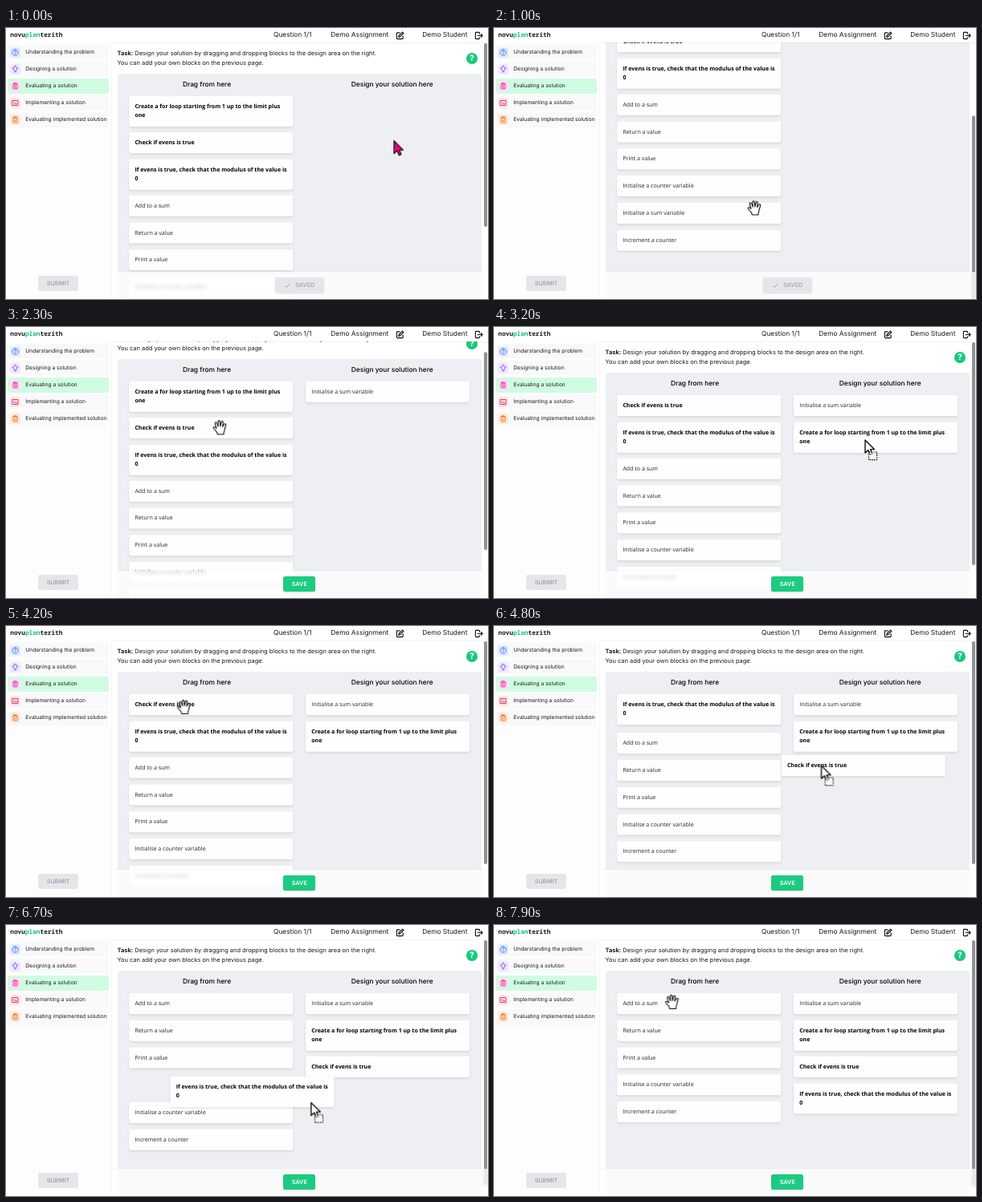
An HTML page that plays this animation: 600x338 px, repeating every 8000 ms.

```html
<!DOCTYPE html>
<html lang="en">
<head>
<meta charset="utf-8">
<title>Block ordering task</title>
<style>
html, body { margin: 0; width: 100%; height: 100%; overflow: hidden; background: #fff; }
#stage { position: relative; width: 600px; height: 338px; overflow: hidden; background: #fff;
  font: 7.46px/12px Inter, sans-serif; color: #17191c; text-rendering: geometricPrecision; }
#stage div, #stage svg { position: absolute; }
#stage svg { overflow: visible; fill: none; stroke-linecap: round; stroke-linejoin: round; }
.t { white-space: pre; }
#side { left: 0; top: 18px; width: 131px; height: 320px; background: #fdfdfd; border-right: 1px solid #f4f5f6; }
.item { left: 2px; width: 126px; height: 18.6px; border-radius: 2px; background: #f9f9fb; }
.item.on { background: #cffce1; }
.badge { left: 3px; top: 2.8px; width: 13px; height: 13px; border-radius: 3px; }
.btn { top: 7.2px; height: 19.2px; border-radius: 2.5px; line-height: 19.2px; text-align: center;
  font-weight: 600; font-size: 7.3px; }
.off { background: #e4e6ea; color: #9ea3ab; }
.save { background: #1bcb7f; color: #fff; box-shadow: 0 1px 2px #0000001c; }
#view { left: 132px; top: 18px; width: 468px; height: 320px; overflow: hidden; }
#page { left: -132px; top: -18px; width: 600px; height: 520px; }
#panel { left: 138.5px; top: 57px; width: 453.5px; height: 460px; border-radius: 4px; background: #edeff2; }
#help { left: 573.2px; top: 31.2px; width: 13.6px; height: 13.6px; border-radius: 50%; background: #18c97d;
  color: #fff; font: 700 10.5px/13.6px Inter, sans-serif; text-align: center; }
.head { width: 204px; text-align: center; font-size: 8.35px; font-weight: 500; color: #000; }
.card { left: 0; top: 0; width: 189.6px; padding: 7.6px 7.2px; border-radius: 2.5px; background: #fefefe;
  box-shadow: 0 1.5px 3.5px #0000001a; white-space: pre;
  font: 7.05px/11.2px "Open Sans", "Noto Sans", sans-serif; color: #222428; }
.card.b { font-weight: 700; font-size: 7.03px; color: #000; }
#bar { left: 595.4px; top: 19px; width: 3.2px; border-radius: 2px; background: #8f9193; }
#foot { left: 132px; top: 304px; width: 468px; height: 34px; background: #ffffffb4;
  backdrop-filter: blur(2px); box-shadow: 0 -1px 2px #00000008; }
#head { left: 0; top: 0; width: 600px; height: 18px; background: #fff; box-shadow: 0 .5px 1px #0000000d; }
#logo { left: 5.3px; top: 3px; font: 700 7.75px/12px "Noto Sans Mono", "DejaVu Sans Mono", monospace; }
#logo span { color: #17c47b; }
</style>
</head>
<body>
<div id="stage"></div>
<script>
const LOOP = 8000;
const stage = document.getElementById('stage');

function box(parent, cls, css = '', html = '') {
  const el = document.createElement('div');
  if (cls[0] === '#') el.id = cls.slice(1); else el.className = cls;
  el.style.cssText = css;
  el.innerHTML = html;
  parent.append(el);
  return el;
}
const text = (parent, x, mid, html, css = '') =>
  box(parent, 't', `left:${x}px;top:${mid - 6}px;${css}`, html);
const icon = (path, color, x, y, size, width = 2.2) =>
  `<svg viewBox="0 0 24 24" width="${size}" height="${size}" style="left:${x}px;top:${y}px"
    stroke="${color}" stroke-width="${width}"><path d="${path}"/></svg>`;

// keys: [time, ...values]; the first and last values are held out to the loop's ends
function play(el, keys, style, easing = 'linear') {
  const all = [[0, ...keys[0].slice(1)], ...keys, [LOOP, ...keys.at(-1).slice(1)]];
  el.animate(all.map(([t, ...v]) => ({ offset: t / LOOP, easing, ...style(...v) })),
    { duration: LOOP, iterations: Infinity });
}
const HOLD = 'steps(1, end)';
const moveTo = (x, y, easing = 'linear') => ({ transform: `translate(${x}px, ${y}px)`, easing });
const fade = on => ({ opacity: on ? 1 : 0 });

// Scrolling page
const page = box(box(stage, '#view'), '#page');
box(page, '#panel');
box(page, '#help', '', '?');
text(page, 138.5, 32.4, '<b>Task:</b> Design your solution by dragging and dropping blocks to the design area on the right.');
text(page, 138.5, 43.6, 'You can add your own blocks on the previous page.');
text(page, 148, 70.7, 'Drag from here').classList.add('head');
text(page, 378.7, 70.7, 'Design your solution here').classList.add('head');

// Cards: a trailing "*" marks the bold ones
const LEFT = 153.2, RIGHT = 373, TOP = 84.9, ONE = 33.8, TWO = 45;
const labels = [
  'Create a for loop starting from 1 up to the limit plus\none*',
  'Check if evens is true*',
  'If evens is true, check that the modulus of the value is\n0*',
  'Add to a sum', 'Return a value', 'Print a value',
  'Initialise a counter variable', 'Initialise a sum variable', 'Increment a counter'
];
let slot = TOP;
const cards = labels.map(s => {
  const el = box(page, s.endsWith('*') ? 'card b' : 'card');
  el.textContent = s.replace('*', '');
  const card = { el, pitch: s.includes('\n') ? TWO : ONE, keys: [[0, LEFT, slot]] };
  slot += card.pitch;
  return card;
});

// Each drag: pointer path from grab to drop, when the gap closes, how many rows
// the card passes on its way, and when the pointer wakes up again
const drags = [
  { id: 7, path: [[1100, 324, 224.5], [1400, 535, 150.5]], leave: 1250, passed: 0, wake: 1690 },
  { id: 0, path: [[2500, 252, 124], [3000, 462, 141]], leave: 2780, passed: 0, wake: 3690 },
  { id: 1, path: [[4400, 203, 98], [4850, 432.5, 183.5]], leave: 4620, passed: 1, wake: 5690 },
  { id: 2, path: [[6250, 328.5, 117.5], [6700, 379.5, 221.5], [6950, 453, 225]], leave: 6655, passed: 3, wake: 7490 }
];
const SETTLE = 180, CLOSE = 200, PAUSE = 150, VIEW = 319;
const route = [[0, 483.5, 140.5], [300, 330, 178]];
const phases = [[0, 'arrow'], [190, 'hand']];
const heights = [[0, 445]];
let rows = cards, rightSlot = TOP, wake = 550;

// Rest after the last action, then glide to the next place
function approach(t, x, y) {
  const [, px, py] = route.at(-1);
  route.push([wake + PAUSE, px, py, 'ease-out'], [t, x, y]);
}

for (const d of drags) {
  const card = cards[d.id];
  const [grab, gx, gy] = d.path[0];
  const [, x0, y0] = card.keys.at(-1);
  const end = d.path.at(-1)[0] + SETTLE;

  card.el.style.zIndex = 1;
  card.keys.push(...d.path.map(([t, x, y]) => [t, x0 + x - gx, y0 + y - gy]), [end, RIGHT, rightSlot]);
  rightSlot += card.pitch;

  rows.slice(rows.indexOf(card) + 1).forEach((row, k) => {
    const [, x, y] = row.keys.at(-1);
    const start = d.leave - (k < d.passed ? CLOSE : 0);
    row.keys.push([start, x, y], [start + CLOSE, x, y - card.pitch]);
  });
  rows = rows.filter(row => row !== card);

  approach(grab - 100, gx, gy);
  route.push(...d.path);
  phases.push([grab, 'drag'], [d.wake, 'hand']);
  heights.push([end, Math.max(330, heights.at(-1)[1] - card.pitch)]);
  wake = d.wake;
}
approach(7880, 221.5, 96);
cards.forEach(c => play(c.el, c.keys, moveTo));

// Scroll and scrollbar
const scroll = [[490, 0], [590, 126], [1500, 126], [1590, 92], [2050, 92], [2358, 0]];
const bar = box(stage, '#bar');
play(page, scroll, y => moveTo(0, -y));
play(bar, scroll, y => moveTo(0, y * VIEW / heights[0][1]));
play(bar, heights, h => ({ height: VIEW * VIEW / h + 'px' }), HOLD);

const foot = box(stage, '#foot');
const saved = box(foot, 'btn off', 'left:203px;width:60.5px;font-weight:500;text-indent:14px;box-shadow:0 1px 2px #0002',
  'SAVED' + icon('M4 13l5 5L20 6', '#9ea3ab', 11, 5.5, 8.5, 2.6));
const save = box(foot, 'btn save', 'left:213.2px;width:40.2px', 'SAVE');
const dirty = heights[1][0];
play(saved, [[0, true], [dirty, false]], fade, HOLD);
play(save, [[0, false], [dirty, true]], fade, HOLD);

// Header
const head = box(stage, '#head');
box(head, '#logo', '', 'novu<span>plan</span>terith');
[[333, 'Question 1/1'], [404.3, 'Demo Assignment'], [518.3, 'Demo Student']]
  .forEach(([x, s]) => text(head, x, 9.2, s, 'font-size:8.35px'));
head.insertAdjacentHTML('beforeend',
  icon('M11 4H5a2 2 0 0 0-2 2v13a2 2 0 0 0 2 2h13a2 2 0 0 0 2-2v-6M18.5 2.5l3 3L12 15l-4 1 1-4z', '#111', 485, 3.6, 11, 2.5) +
  icon('M14 7V5a2 2 0 0 0-2-2H5a2 2 0 0 0-2 2v14a2 2 0 0 0 2 2h7a2 2 0 0 0 2-2v-2M9 12h13M18 8l4 4-4 4', '#111', 583, 3.6, 11, 2.5));

// Sidebar
const side = box(stage, '#side');
const clip = 'M9 4H6a1 1 0 0 0-1 1v15a1 1 0 0 0 1 1h12a1 1 0 0 0 1-1V5a1 1 0 0 0-1-1h-3M9 2h6v4H9z';
[
  ['Understanding the problem', '#3563e9', '#e0eaff', 'M12 2a10 10 0 1 0 .01 0M9 9a3 3 0 1 1 4 3q-1 .5-1 2M12 17v.1'],
  ['Designing a solution', '#7a3ff0', '#eee8ff', 'M9 17c0-3-3-4-3-8a6 6 0 0 1 12 0c0 4-3 5-3 8zM10 21h4M12 1V0M3 9H2M22 9h-1'],
  ['Evaluating a solution', '#d81b9a', '#fbdff0', clip + 'M9 11h6M9 16h6'],
  ['Implementing a solution', '#e11d48', '#ffe3e6', 'M3 4h18v16H3zM7 9l3 3-3 3M12 15h5'],
  ['Evaluating implemented solution', '#ea580c', '#ffe9d6', clip + 'M9 14l2 2 4-5']
].forEach(([s, color, tint, path], i) => {
  const item = box(side, 'item' + (i === 2 ? ' on' : ''), `top:${2.8 + 21.1 * i}px`);
  box(item, 'badge', `background:${tint}`, icon(path, color, 2, 2, 9));
  text(item, 22.3, 9.3, s, 'font-size:6.63px');
});
box(side, 'btn off', 'left:40px;top:291px;width:50px', 'SUBMIT');

// Pointer
const pointer = box(stage, 'pointer', 'left:0;top:0');
const arrow = 'M0 0V16L3.9 12.6 6.4 18.2 9 17 6.6 11.6H11.5Z';
const looks = {
  arrow: `<path d="${arrow}" fill="#e5077f" stroke="#26121d" stroke-width="1.3"/>`,
  hand: `<path transform="translate(-9.2 -10)" fill="#fff" stroke="#111" stroke-width="1.1" d="M6.5 18.5L5.8 16C4 14 2.5 12.4 1.4 10.8
    C.9 9.4 2.4 8.7 3.6 9.7L5.2 11 3.4 5C3.1 3.4 5.1 2.9 5.7 4.4L7.4 8.6 7.2 2.6C7.2 1 9.4 1 9.5 2.6L10 8.4 11.4 3
    C11.8 1.6 13.7 2 13.5 3.6L12.7 9 14.9 5.8C15.8 4.6 17.4 5.5 16.8 7L15.4 12C15.2 14 14.6 15.4 14.2 16.4V18.5Z"/>`,
  drag: `<path d="${arrow}" fill="#fff" stroke="#111" stroke-width="1.4"/>
    <rect x="4.6" y="15" width="10" height="9.6" fill="#fff8" stroke="#111" stroke-width="1.2"
      stroke-dasharray="1.6 1.1" stroke-linecap="butt"/>`
};
for (const name in looks) {
  const el = box(pointer, name, '', `<svg width="1" height="1" style="left:0;top:0">${looks[name]}</svg>`);
  play(el, phases.map(([t, n]) => [t, n === name]), fade, HOLD);
}
play(pointer, route, moveTo);
</script>
</body>
</html>
```
